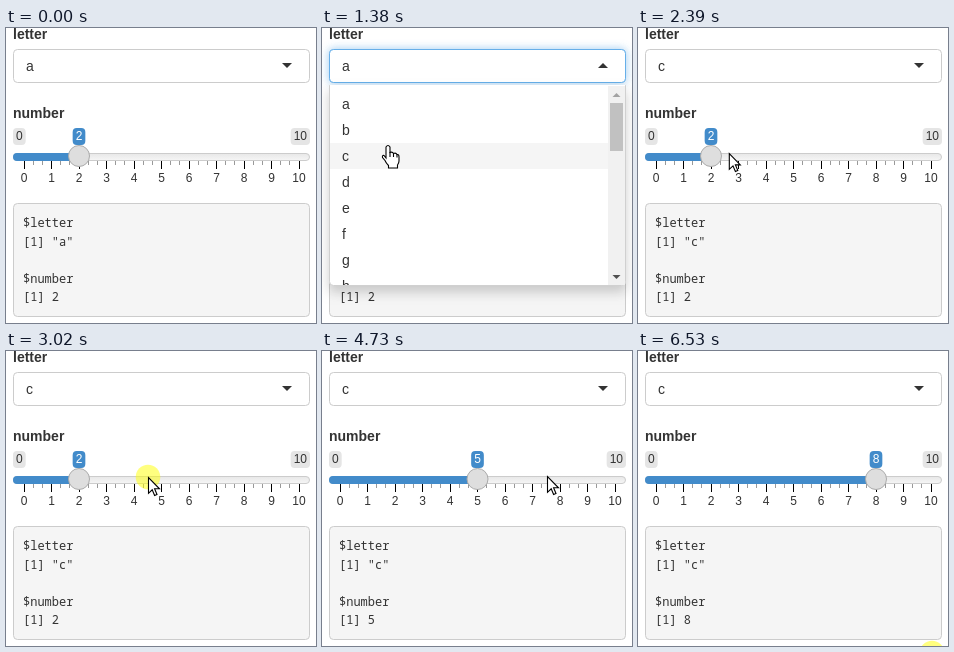
Animation, 310 px wide and 295 px high, one loop 6.61 s. Source, as an HTML page with a canvas:

```html
<!DOCTYPE html>
<html lang="en">
<head>
<meta charset="utf-8">
<title>Select and slider demo</title>
<style>
html, body { margin: 0; width: 100%; height: 100%; overflow: hidden; background: #fff; }
canvas { display: block; width: 310px; height: 295px; }
</style>
</head>
<body>
<canvas id="stage"></canvas>
<script>
const W = 310, H = 295, LOOP = 6610;
const SANS = '"Liberation Sans", Arial, sans-serif';
const MONO = '"Noto Sans Mono", "DejaVu Sans Mono", monospace';
const BLUE = '#428bca', INK = '#333';
const LEFT = 7, WIDTH = 297, RIGHT = LEFT + WIDTH;

const canvas = document.getElementById('stage');
const ctx = canvas.getContext('2d');
const dpr = window.devicePixelRatio || 1;
canvas.width = W * dpr;
canvas.height = H * dpr;

// Pointer moves: start, end, steps, from, to, bow (vertical bulge)
const moves = [
  { t0: 130, t1: 370, n: 4, from: [255, 194], to: [91, 39], bow: -32 },
  { t0: 910, t1: 1380, n: 7, from: [89, 46], to: [66, 117], bow: 0 },
  { t0: 1460, t1: 1460, n: 1, from: [67, 116], to: [67, 116], bow: 0 },
  { t0: 2300, t1: 2700, n: 6, from: [62, 119], to: [142, 126], bow: 6 },
  { t0: 3170, t1: 3550, n: 6, from: [146, 128], to: [225, 123], bow: 5 },
  { t0: 4730, t1: 4880, n: 3, from: [225, 125], to: [227, 132], bow: 0 },
  { t0: 6060, t1: 6380, n: 5, from: [229, 138], to: [294, 302], bow: 0 }
];
const clicks = [[600, 680], [1610, 1830], [3020, 3170], [4270, 4330], [5050, 5200], [6530, LOOP]];

const within = (t, a, b) => t >= a && t < b;
const valueX = v => LEFT + 11 + v * (WIDTH - 22) / 10;

function pointerAt(t) {
  const m = moves.filter(m => t >= m.t0).pop();
  if (!m) return null;
  const last = m.n - 1;
  const step = last ? Math.min(last, Math.floor((t - m.t0) / (m.t1 - m.t0) * last + 0.1)) : 0;
  const u = last ? step / last : 1;
  const e = 1 - (1 - u) ** 2;
  const mix = i => m.from[i] + (m.to[i] - m.from[i]) * e;
  return { x: mix(0), y: mix(1) + m.bow * Math.sin(Math.PI * u) };
}

function text(s, x, y, font, color = INK, align = 'left') {
  ctx.font = font;
  ctx.fillStyle = color;
  ctx.textAlign = align;
  ctx.fillText(s, x, y);
}

function rect(x, y, w, h, fill) {
  ctx.fillStyle = fill;
  ctx.fillRect(x, y, w, h);
}

function round(x, y, w, h, r, fill, stroke) {
  ctx.beginPath();
  if (stroke) ctx.roundRect(x + 0.5, y + 0.5, w - 1, h - 1, r);
  else ctx.roundRect(x, y, w, h, r);
  ctx.fillStyle = fill;
  ctx.fill();
  if (stroke) {
    ctx.lineWidth = 1;
    ctx.strokeStyle = stroke;
    ctx.stroke();
  }
}

function disc(x, y, r, fill) {
  ctx.beginPath();
  ctx.arc(x, y, r, 0, 2 * Math.PI);
  ctx.fillStyle = fill;
  ctx.fill();
}

// Triangle with its base at y and its tip at y + h
function triangle(x, y, half, h, fill) {
  ctx.beginPath();
  ctx.moveTo(x - half, y);
  ctx.lineTo(x + half, y);
  ctx.lineTo(x, y + h);
  ctx.fillStyle = fill;
  ctx.fill();
}

function withShadow(color, blur, dy, draw) {
  ctx.save();
  ctx.shadowColor = color;
  ctx.shadowBlur = blur * dpr;
  ctx.shadowOffsetY = dy * dpr;
  draw();
  ctx.restore();
}

function drawSelect(letter, open) {
  text('letter', LEFT, 11, 'bold 14px ' + SANS);
  const box = () => round(LEFT, 21, WIDTH, 34, 4, '#fff', open ? '#66afe9' : '#ccc');
  if (open) withShadow('rgba(102,175,233,.6)', 8, 0, box);
  box();
  text(letter, 20, 43, '14px ' + SANS);
  if (open) triangle(281, 40, 5, -5, INK);
  else triangle(281, 35, 5, 5, INK);
}

function drawTag(s, x, y, bg, color, align) {
  const font = '12px ' + SANS;
  ctx.font = font;
  const w = ctx.measureText(s).width + 6;
  const left = x - w * align;
  round(left, y, w, 17, 4, bg);
  text(s, left + 3, y + 12, font, color);
}

function drawSlider(value) {
  const x = valueX(value);
  text('number', LEFT, 90, 'bold 14px ' + SANS);
  drawTag('0', LEFT, 100, '#e5e5e5', INK, 0);
  drawTag('10', RIGHT, 100, '#e5e5e5', INK, 1);
  drawTag(String(value), x, 100, BLUE, '#fff', 0.5);

  for (let i = 0; i <= 30; i++) {
    const big = i % 3 === 0;
    const tx = Math.round(valueX(i / 3) - 0.5);
    rect(tx, 133, 1, big ? 8 : 4, big ? '#000' : '#999');
    if (big) text(i / 3, valueX(i / 3), 154, '12px ' + SANS, INK, 'center');
  }

  const groove = ctx.createLinearGradient(0, 121, 0, 137);
  groove.addColorStop(0, '#dedede');
  groove.addColorStop(1, '#fff');
  round(LEFT, 125, WIDTH, 8, 4, groove, '#ccc');
  round(LEFT, 125, x - LEFT, 8, [4, 0, 0, 4], BLUE);
  round(x - 11, 117, 22, 22, 11, '#dedede', '#ababab');
}

function drawOutput(letter, value) {
  round(LEFT, 175, WIDTH, 114, 4, '#f5f5f5', '#ccc');
  const lines = ['$letter', `[1] "${letter}"`, '', '$number', `[1] ${value}`];
  lines.forEach((s, i) => text(s, 17, 199 + i * 18.5, '12px ' + MONO));
}

function drawMenu(hover) {
  const top = 57, bottom = 258;
  const panel = () => round(LEFT, top, WIDTH, bottom - top, [0, 0, 4, 4], '#fff', '#d0d0d0');
  withShadow('rgba(0,0,0,.175)', 12, 6, panel);
  panel();
  ctx.save();
  ctx.beginPath();
  ctx.rect(LEFT + 1, top, WIDTH - 2, bottom - top - 1);
  ctx.clip();
  rect(LEFT + 1, top, WIDTH - 2, 2, '#fff');
  [...'abcdefgh'].forEach((s, i) => {
    const y = 63 + i * 26;
    if (i === hover) rect(LEFT + 1, y, WIDTH - 2, 26, '#f5f5f5');
    text(s, 20, y + 18, '14px ' + SANS);
  });
  rect(286, top + 1, 17, 200, '#f1f1f1');
  rect(288, 75, 13, 48, '#c1c1c1');
  triangle(294.5, 69, 4, -4, '#a3a3a3');
  triangle(294.5, 247, 4, 4, '#505050');
  ctx.restore();
}

const arrow = new Path2D('M.5 .5V16.3L4.2 12.8L6.6 18.5L9 17.5L6.6 11.8H11.5Z');
const hand = new Path2D('M-2 13V2Q0-1 2 2V7.5Q4.5 6.5 5.5 8.5Q8 7.5 9 9.5Q11 9 11 12V16' +
  'Q11 18 9.5 20V23H.5V20.5Q-2 18-3 15.5L-5.5 12.5Q-6 10-4 10.5Z');
const knuckles = new Path2D('M2 7V12M5.5 8.5V12M9 9.5V12.5');

function drawPointer(p, isHand) {
  ctx.save();
  ctx.translate(p.x, p.y);
  ctx.lineWidth = 1.1;
  ctx.fillStyle = '#fff';
  ctx.strokeStyle = '#000';
  const shape = isHand ? hand : arrow;
  ctx.fill(shape);
  ctx.stroke(shape);
  if (isHand) ctx.stroke(knuckles);
  ctx.restore();
}

function draw(t) {
  const open = within(t, 830, 1680);
  const p = pointerAt(t);
  const value = t < 3100 ? 2 : t < 5130 ? 5 : 8;
  const shown = t < 3870 ? 2 : t < 5830 ? 5 : 8;

  ctx.setTransform(dpr, 0, 0, dpr, 0, 0);
  rect(0, 0, W, H, '#fff');
  drawSelect(t < 1680 ? 'a' : 'c', open);
  drawSlider(value);
  drawOutput(t < 1750 ? 'a' : 'c', shown);
  if (open) drawMenu(Math.max(0, Math.floor((p.y - 63) / 26)));
  if (!p) return;
  if (clicks.some(c => within(t, c[0], c[1]))) disc(p.x, p.y, 12.3, 'rgba(255,255,0,.5)');
  drawPointer(p, within(p.y, 21, 55) || open);
}

const start = performance.now();
function tick() {
  draw((performance.now() - start) % LOOP);
  requestAnimationFrame(tick);
}
tick();
</script>
</body>
</html>
```
